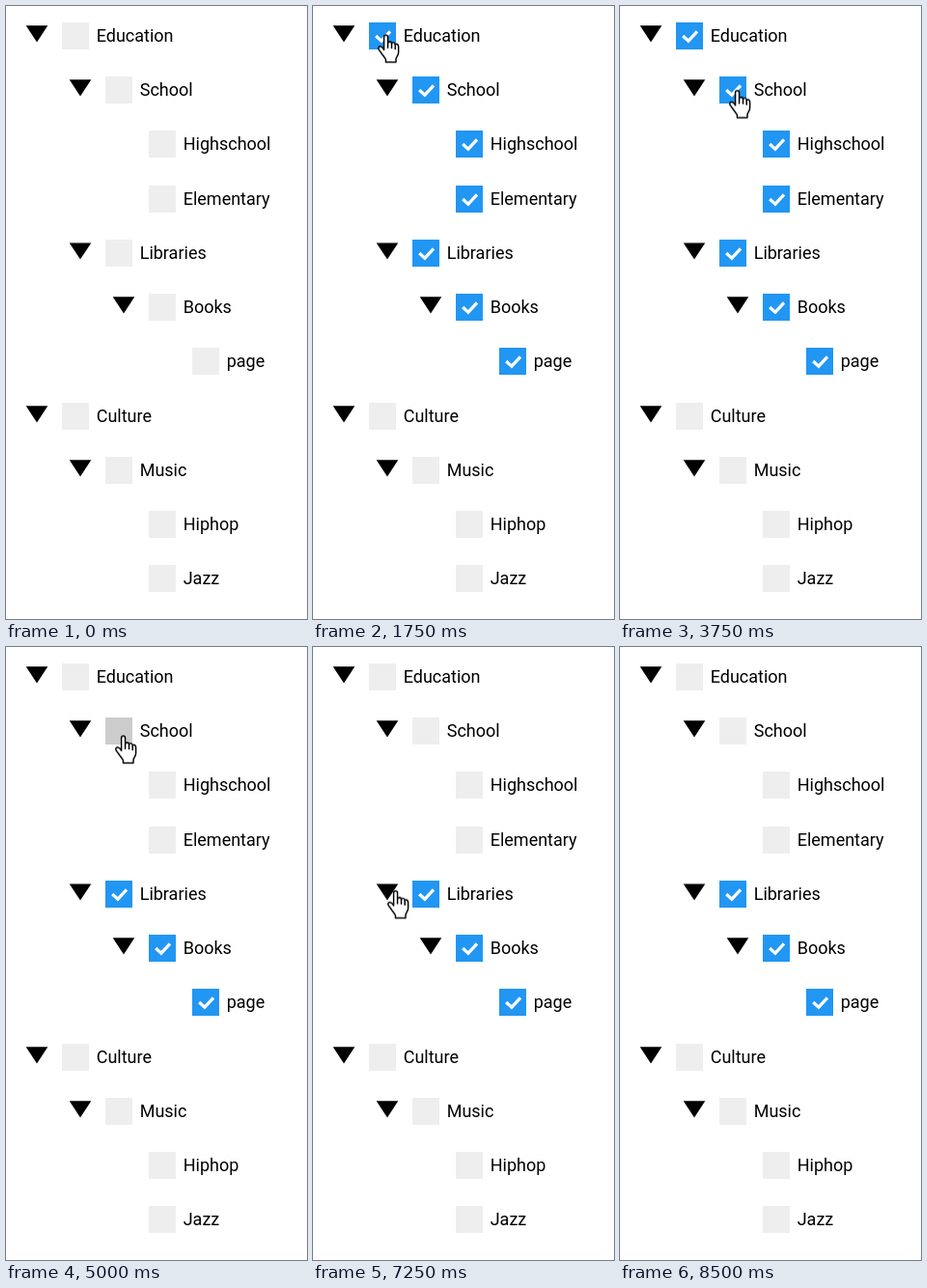
Write an HTML page that moves like this. It is 312 px wide and 635 px high and loops after 9.25 s.

```html
<!DOCTYPE html>
<html lang="en">
<head>
<meta charset="utf-8">
<title>Checkbox tree</title>
<style>
  html, body { margin: 0; width: 100%; height: 100%; overflow: hidden; background: #fff; }
  svg { display: block; }
  text { font: 18px Roboto, Arial, sans-serif; fill: #000; }
  .idle { fill: #eee; }
  .hover { fill: #ccc; }
  .on { fill: #2196f3; }
  .tick { fill: none; stroke: #fff; stroke-width: 3.2; }
  .cursor path { fill: #fff; stroke: #000; stroke-width: 1.1; stroke-linejoin: round; }
</style>
</head>
<body>
<svg id="stage" width="312" height="635" viewBox="0 0 312 635"></svg>
<script>
const LOOP = 9250;
const COLLAPSE = 7500, EXPAND = 8000;
const stage = document.getElementById('stage');

// label, depth, has children, [checked from, checked until], [hovered from, hovered until]
const rows = [
  ['Education', 0, true, [1750, 4000], [1500, 1750]],
  ['School', 1, true, [1750, 4000], [4000, 5250]],
  ['Highschool', 2, false, [1750, 4000]],
  ['Elementary', 2, false, [1750, 4000]],
  ['Libraries', 1, true, [1750, LOOP]],
  ['Books', 2, true, [1750, LOOP]],
  ['page', 3, false, [1750, LOOP]],
  ['Culture', 0, true],
  ['Music', 1, true],
  ['Hiphop', 2, false],
  ['Jazz', 2, false]
];
const PARENT = 4, HIDDEN = 2;

// time, shape, left, top
const moves = [
  [0, '', 0, 0],
  [250, 'arrow', 112, 575],
  [500, 'arrow', 88, 430],
  [750, 'arrow', 52, 262],
  [1000, 'arrow', 32, 120],
  [1250, 'arrow', 47, 34],
  [1500, 'hand', 66, 31],
  [1750, 'hand', 67, 29.5],
  [2250, 'hand', 65, 33],
  [2500, 'arrow', 66, 62],
  [2750, 'arrow', 82, 118],
  [3000, 'arrow', 104, 160],
  [3250, 'arrow', 118, 122],
  [3500, 'hand', 113, 90],
  [3750, 'hand', 113, 87],
  [5000, 'hand', 113, 91.5],
  [5250, 'arrow', 128, 112],
  [5500, 'arrow', 117, 168],
  [5750, 'arrow', 98, 230],
  [6000, 'arrow', 82, 219],
  [6250, 'arrow', 92, 270],
  [6500, 'arrow', 97, 301],
  [6750, 'arrow', 99, 305],
  [7000, 'arrow', 88, 280],
  [7250, 'hand', 77, 252],
  [7500, 'hand', 79, 252],
  [8250, 'arrow', 110, 340],
  [8500, '', 0, 0]
];

function add(parent, tag, attrs = {}) {
  const el = document.createElementNS('http://www.w3.org/2000/svg', tag);
  for (const k in attrs) el.setAttribute(k, attrs[k]);
  parent.append(el);
  return el;
}

// Holds each value until the next time in the list.
function play(el, prop, steps) {
  const frames = steps.map(([t, v]) => ({ offset: t / LOOP, [prop]: v, easing: 'steps(1, end)' }));
  frames.push({ offset: 1, [prop]: steps[steps.length - 1][1] });
  el.animate(frames, { duration: LOOP, iterations: Infinity });
}

function showFor(el, [from, to]) {
  const steps = [[0, 0], [from, 1]];
  if (to < LOOP) steps.push([to, 0]);
  play(el, 'opacity', steps);
}

const rowTop = i => Math.round(16.8 + 56.25 * i);
const shift = (x, y) => `translate(${x}px, ${y}px)`;

rows.forEach(([label, depth, parent, checked, hovered], i) => {
  const x = 58 + 45 * depth, y = rowTop(i);
  const row = add(add(stage, 'g', { transform: `translate(${x} ${y})` }), 'g');
  const box = (group, cls) => add(group, 'rect', { class: cls, width: 28, height: 28 });

  if (parent) {
    const holder = add(row, 'g', { transform: 'translate(-26 11.9)' });
    const mark = add(holder, 'path', { d: 'M-11.3 -8.6H11.3L0 8.6Z' });
    if (i === PARENT) {
      mark.style.transformOrigin = '0 0';
      play(mark, 'transform', [[0, 'rotate(0deg)'], [COLLAPSE, 'rotate(-90deg)'], [EXPAND, 'rotate(0deg)']]);
    }
  }
  box(row, 'idle');
  if (hovered) showFor(box(row, 'hover'), hovered);
  if (checked) {
    const on = add(row, 'g');
    box(on, 'on');
    add(on, 'path', { class: 'tick', d: 'M7.2 14L12.9 19.2L22 9.3' });
    showFor(on, checked);
  }
  add(row, 'text', { x: 35.7, y: 20 }).textContent = label;

  if (i > PARENT + HIDDEN) {
    const up = shift(0, rowTop(i - HIDDEN) - y);
    play(row, 'transform', [[0, shift(0, 0)], [COLLAPSE, up], [EXPAND, shift(0, 0)]]);
  } else if (i > PARENT) {
    play(row, 'opacity', [[0, 1], [COLLAPSE, 0], [EXPAND, 1]]);
  }
});

const shapes = {
  arrow: ['M.5 .5V17L4.3 13.4L7 19L9.3 18L6.9 12.3H12Z'],
  hand: [
    'M5 12V2Q5 .5 6.5 .5Q8 .5 8 2V7Q8.2 5.6 9.6 5.6Q11 5.7 11 7.4Q11.2 6.2 12.5 6.3' +
    'Q13.8 6.5 13.8 8.2Q14.2 7.3 15.2 7.5Q16.4 8 16.4 9.5V14Q16.4 15.5 15.4 17L14.4 19V21.8' +
    'H6.4V19.5Q5.4 18 3.5 15.5L1 12Q.1 10.5 1.2 9.6Q2.6 9 4 10.6Z',
    'M8 7V11M11 7.4V11.2M13.8 8.2V11.8'
  ]
};

for (const name in shapes) {
  const cursor = add(stage, 'g', { class: 'cursor' });
  const art = add(cursor, 'g', { transform: 'scale(1.32)' });
  shapes[name].forEach(d => add(art, 'path', { d }));
  play(cursor, 'opacity', moves.map(([t, shape]) => [t, shape === name ? 1 : 0]));
  play(cursor, 'transform', moves.map(([t, , x, y]) => [t, shift(x, y)]));
}
</script>
</body>
</html>
```
